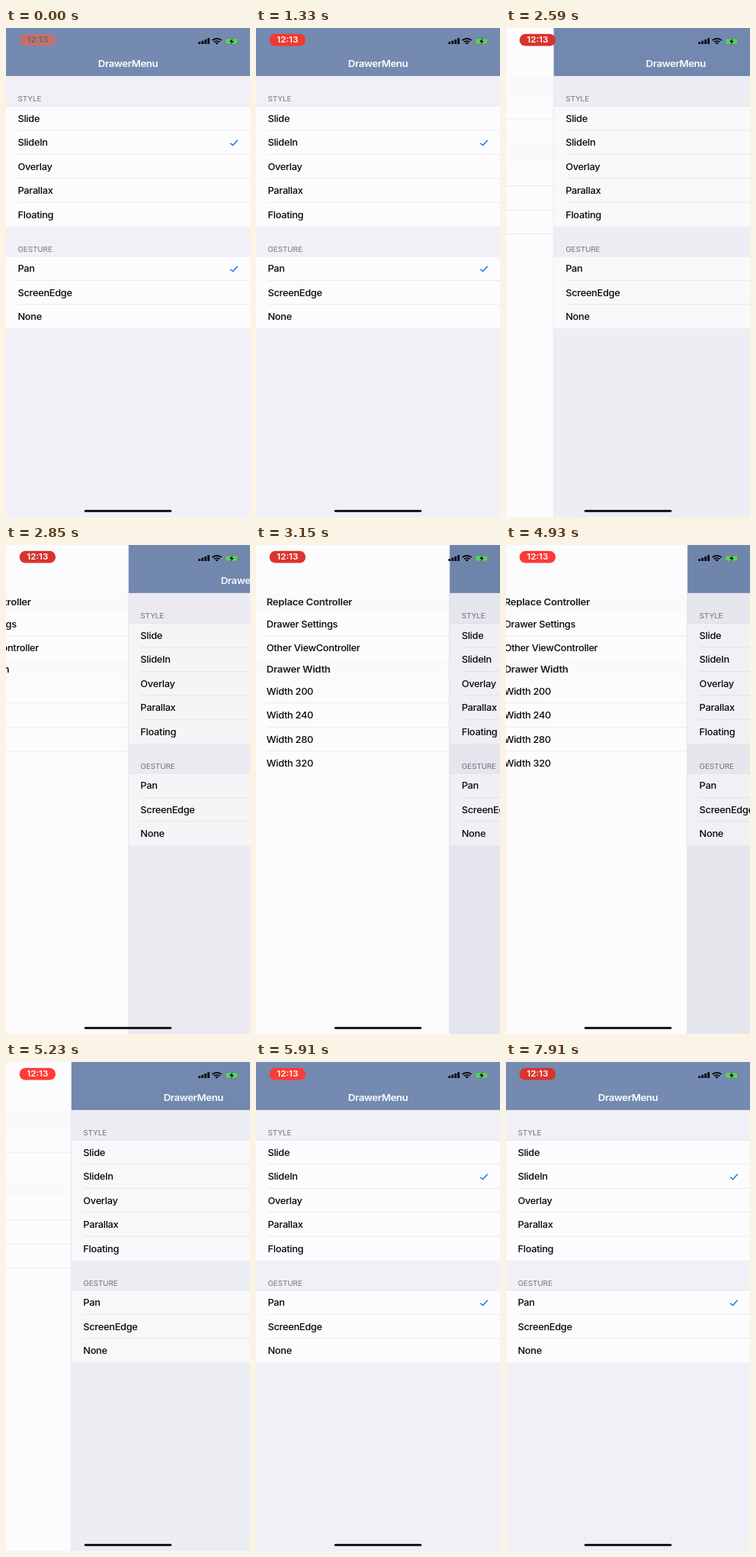
An HTML page for the animation above (8 s loop, 320x640 px).

```html
<!DOCTYPE html>
<html lang="en">
<head>
<meta charset="utf-8">
<title>Drawer menu</title>
<style>
  @property --open { syntax: "<number>"; inherits: true; initial-value: 0; }

  html, body { margin: 0; width: 100%; height: 100%; overflow: hidden; background: #fcfcfe; }

  /* A 414 x 896 pt phone screen fitted to the 320 x 640 stage */
  .screen {
    --drawer: 331.2px;
    --line: #e3e3e9;
    position: absolute; left: 0; top: 0; width: 414px; height: 896px;
    overflow: hidden; background: #fcfcfe; color: #050508;
    font: 450 16.5px/44px Inter, sans-serif; letter-spacing: -.35px; white-space: nowrap;
    transform: scale(calc(320 / 414), calc(640 / 896)); transform-origin: 0 0;
    animation: drag 8s infinite linear;
  }
  .slider {
    position: absolute; inset: 0;
    transform: translateX(calc(var(--open) * var(--drawer)));
  }
  .drawer, .main { position: absolute; top: 0; height: 100%; }
  .drawer {
    left: calc(-1 * var(--drawer)); width: var(--drawer);
    box-sizing: border-box; padding-top: 88px; background: #fcfcfe;
  }
  .main { left: 0; width: 414px; background: #f0f0f6; box-shadow: 0 0 3px rgba(80, 80, 110, .45); }
  .dim { position: absolute; inset: 0; background: rgb(30, 30, 70); opacity: calc(var(--open) * .05); }

  .nav {
    height: 88px; background: #748ab0; color: #fff;
    font-weight: 600; font-size: 17px; letter-spacing: -.5px; text-align: center;
  }
  .nav span { position: relative; top: 44px; }

  h2, h3, ul { margin: 0; padding: 0; list-style: none; }
  h2 { padding-left: 20px; font: 600 17px/35px Inter, sans-serif; color: #1c1c20; background: #fafafd; }
  h3 {
    height: 55.5px; padding-left: 20px; box-sizing: border-box;
    font: 400 13px/18px Inter, sans-serif; letter-spacing: -.2px; padding-top: 32px; color: #74747a;
  }
  li { position: relative; height: 44px; padding-left: 20px; }
  li:not(:last-child)::after {
    content: ""; position: absolute; left: 20px; right: 0; bottom: 0; height: 1px; background: var(--line);
  }
  .main ul { background: #fcfcfe; box-shadow: 0 -.5px 0 .5px var(--line); }
  li svg {
    position: absolute; left: 379px; top: 16px; width: 16px; height: 13px;
    fill: none; stroke: #1f7be0; stroke-width: 2;
  }

  .pill {
    position: absolute; left: 23px; top: 10.5px; width: 61px; height: 22px; border-radius: 10px;
    font-weight: 600; font-size: 15px; line-height: 22px; letter-spacing: 0; text-align: center;
    animation: pulse 8s infinite ease-in-out;
  }
  .status { position: absolute; left: 0; top: 0; width: 414px; height: 44px; }
  .home {
    position: absolute; left: 133px; top: 882.7px; width: 148px; height: 4.8px;
    border-radius: 3px; background: #000;
  }

  @keyframes drag {
    0%, 30.375% { --open: 0; animation-timing-function: cubic-bezier(.4, .2, .8, .72); }
    32.375% { --open: .245; }
    33.5% { --open: .245; animation-timing-function: cubic-bezier(.3, .4, .6, .97); }
    39.375% { --open: .993; }
    40.75%, 58.125% { --open: 1; animation-timing-function: ease-in; }
    60.375%, 61.5% { --open: .969; }
    61.625% { --open: .931; animation-timing-function: cubic-bezier(.35, .12, .7, .72); }
    65.375% { --open: .337; animation-timing-function: cubic-bezier(.2, .55, .5, 1); }
    72.375%, 100% { --open: 0; }
  }
  @keyframes pulse {
    0%, .37% { background: #c07270; color: #706468; }
    5% { background: #ff3b34; color: #fff; }
    32.5% { background: #d9332d; color: #fff; }
    68% { background: #ff3b34; color: #fff; }
    100% { background: #da332d; color: #fff; }
  }
</style>
</head>
<body>
<div class="screen">
  <div class="slider">
    <div class="drawer">
      <h2>Replace Controller</h2>
      <ul><li>Drawer Settings</li><li>Other ViewController</li></ul>
      <h2>Drawer Width</h2>
      <ul><li>Width 200</li><li>Width 240</li><li>Width 280</li><li>Width 320</li></ul>
    </div>
    <div class="main">
      <div class="nav"><span>DrawerMenu</span></div>
      <h3>STYLE</h3>
      <ul>
        <li>Slide</li>
        <li>SlideIn<svg><path d="M1.5 7 6 11 14 1.5"/></svg></li>
        <li>Overlay</li>
        <li>Parallax</li>
        <li>Floating</li>
      </ul>
      <h3>GESTURE</h3>
      <ul>
        <li>Pan<svg><path d="M1.5 7 6 11 14 1.5"/></svg></li>
        <li>ScreenEdge</li>
        <li>None</li>
      </ul>
      <div class="dim"></div>
    </div>
  </div>

  <div class="pill">12:13</div>
  <svg class="status" viewBox="0 0 414 44">
    <path d="M326.5 25.5h3.6v4h-3.6zM331.6 23.3h3.6v6.2h-3.6zM336.7 21h3.6v8.5h-3.6zM341.8 18.5h3.6v11h-3.6z"/>
    <g fill="none" stroke="#000" stroke-width="2.4">
      <path d="M350 22.6a11 11 0 0 1 15.6 0M353 25.8a6.8 6.8 0 0 1 9.6 0"/>
    </g>
    <path d="M357.8 30.2 355.2 27.5a3.8 3.8 0 0 1 5.2 0z"/>
    <rect x="371.5" y="18.7" width="22.5" height="11.6" rx="3" fill="none" stroke="#7d8490"/>
    <rect x="373.2" y="20.4" width="19" height="8.2" rx="1.6" fill="#52d858"/>
    <path d="M395.3 22.5q2 2 0 4z" fill="#7d8490"/>
    <path d="M384.2 19.5 379 25.2h3.6l-1.3 4.6 5.4-6.1h-3.5z"/>
  </svg>
  <div class="home"></div>
</div>
</body>
</html>
```
